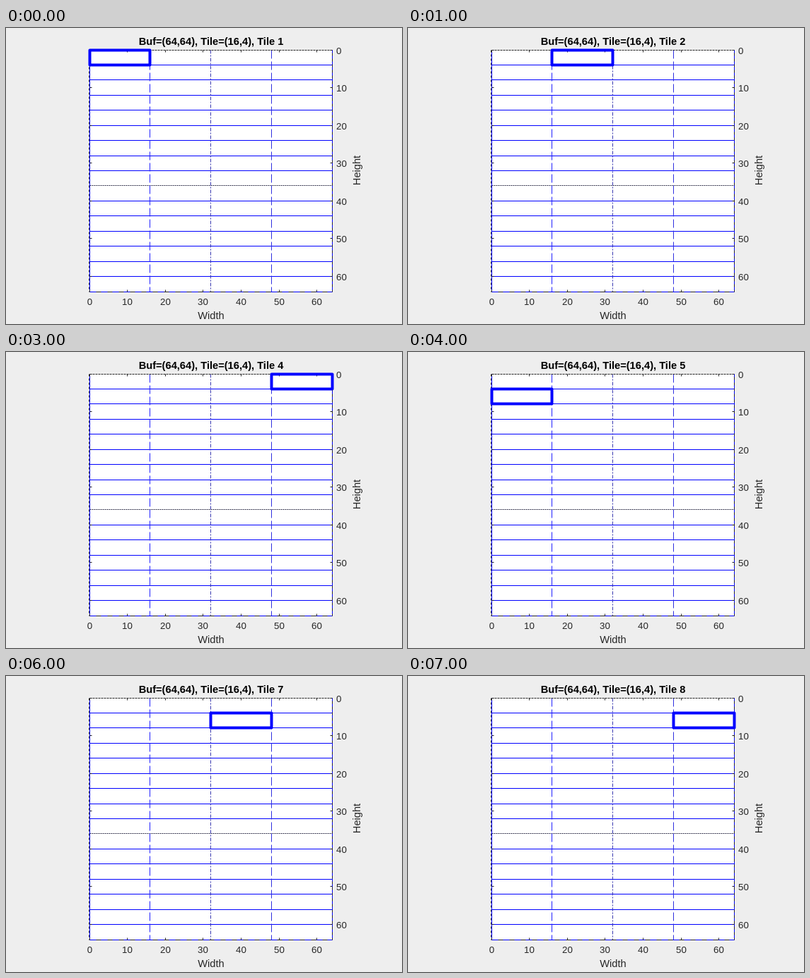
Animation of 560 by 420 pixels, one loop 8000 ms. Source, as an HTML page with a canvas:

```html
<!DOCTYPE html>
<html lang="en">
<head>
<meta charset="utf-8">
<title>Tile order</title>
<style>
  html, body { margin: 0; width: 100%; height: 100%; overflow: hidden; background: #eee; }
  canvas { display: block; }
</style>
</head>
<body>
<canvas id="stage" width="560" height="420"></canvas>
<script>
const ctx = document.getElementById('stage').getContext('2d');
const BLUE = '#0000ff', DARK = '#262626';
const LEFT = 118, TOP = 31, SIZE = 343, CELLS = 64;
const RIGHT = LEFT + SIZE, BOTTOM = TOP + SIZE;
const TILE_W = 16, TILE_H = 4, COLUMNS = CELLS / TILE_W;
const TILE_COUNT = 8, TILE_MS = 1000;

// Grid units to whole pixels; lines are centred on those pixels.
const px = u => Math.round(LEFT - 0.3 + u * SIZE / CELLS);
const py = u => Math.round(TOP - 0.5 + u * SIZE / CELLS);

function line(x1, y1, x2, y2, color, dash = []) {
  ctx.strokeStyle = color;
  ctx.lineWidth = 1;
  ctx.setLineDash(dash);
  ctx.beginPath();
  ctx.moveTo(x1 + 0.5, y1 + 0.5);
  ctx.lineTo(x2 + 0.5, y2 + 0.5);
  ctx.stroke();
}

const row = (y, color, dash) => line(LEFT, y, RIGHT, y, color, dash);
const column = (x, color, dash) => line(x, TOP, x, BOTTOM, color, dash);

function text(str, x, y, font, color, align = 'center') {
  ctx.font = font + ' "Liberation Sans", Arial, sans-serif';
  ctx.fillStyle = color;
  ctx.textAlign = align;
  ctx.fillText(str, x, y);
}

function drawGrid() {
  for (let u = TILE_H; u < CELLS; u += TILE_H) {
    if (u === 36) row(py(u), '#30304a', [2, 1]);
    else row(py(u), BLUE);
  }
  column(px(16), '#2020ff', [12, 4]);
  column(px(32), '#3838b0', [5, 2, 2, 2]);
  column(px(48), '#3030e0', [12, 4]);
}

function drawAxes() {
  row(TOP, DARK, [3, 1]);
  row(BOTTOM, DARK);
  row(BOTTOM, BLUE, [9, 7]);
  column(LEFT, BLUE);
  column(LEFT - 1, DARK, [3, 3]);
  column(RIGHT, DARK);
  column(RIGHT, BLUE, [4, 4]);

  for (let u = 0; u <= 60; u += 10) {
    const x = px(u), y = py(u);
    line(x, BOTTOM, x, BOTTOM - 3, DARK);
    line(x, TOP, x, TOP + 3, DARK);
    line(RIGHT, y, RIGHT - 3, y, DARK);
    line(LEFT, y, LEFT + 3, y, DARK);
    text(u, x + 0.5, 393, '13.33px', DARK);
    text(u, 467, y + 6, '13.33px', DARK, 'left');
  }

  text('Width', 290, 413, '14.67px', DARK);
  ctx.save();
  ctx.translate(501, 202);
  ctx.rotate(-Math.PI / 2);
  text('Height', 0, 0, '14.67px', DARK);
  ctx.restore();
}

function drawTile(index) {
  const u = index % COLUMNS * TILE_W;
  const v = Math.floor(index / COLUMNS) * TILE_H;
  const x = px(u), y = py(v);
  ctx.setLineDash([]);
  ctx.strokeStyle = BLUE;
  ctx.lineWidth = 4;
  ctx.lineJoin = 'round';
  ctx.strokeRect(x + 0.5, y + 0.5, px(u + TILE_W) - x, py(v + TILE_H) - y);
}

function draw(now) {
  const index = Math.floor(now / TILE_MS) % TILE_COUNT;
  ctx.fillStyle = '#eee';
  ctx.fillRect(0, 0, 560, 420);
  ctx.fillStyle = '#fff';
  ctx.fillRect(LEFT, TOP, SIZE, SIZE);
  drawGrid();
  drawAxes();
  drawTile(index);
  text(`Buf=(64,64), Tile=(16,4), Tile ${index + 1}`, 290, 24, 'bold 14.67px', '#000');
}

let start;
function frame(now) {
  start ??= now;
  draw(now - start);
  requestAnimationFrame(frame);
}
draw(0);
requestAnimationFrame(frame);
</script>
</body>
</html>
```
